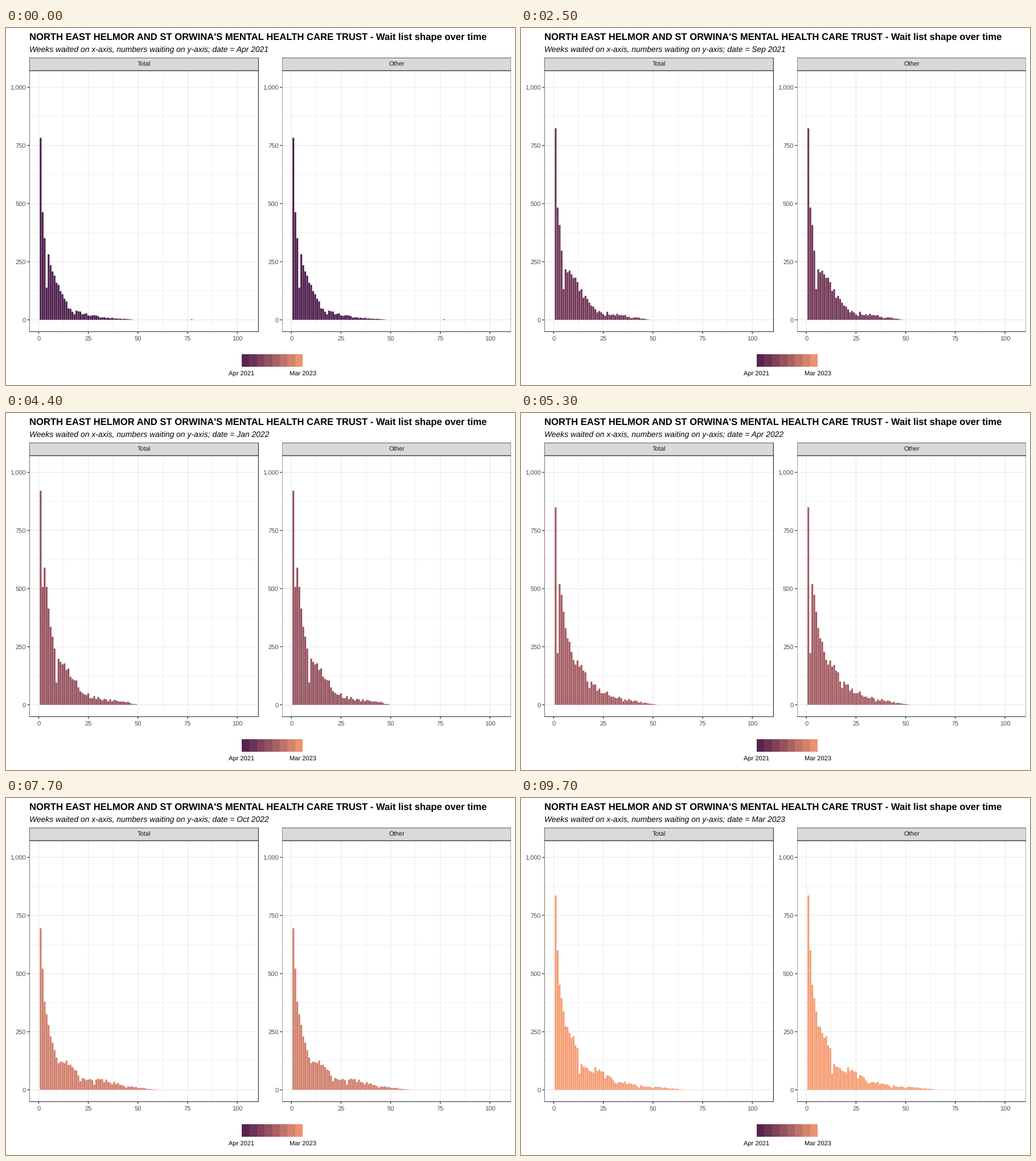
Write a matplotlib script that moves like this. It is 894 px wide and 626 px high and loops after 10000 ms.

```python
import numpy as np
import matplotlib.pyplot as plt
from matplotlib.animation import FuncAnimation
from matplotlib.collections import LineCollection, PolyCollection
from matplotlib.patches import Rectangle
from matplotlib.transforms import Bbox

W, H, DPI = 894, 626, 100
FRAMES, INTERVAL = 100, 100
PX = 72 / DPI  # points per pixel
MAJOR, MINOR = 1.35 * PX, 0.67 * PX

PANELS = {"Total": 41.0, "Other": 484.8}
PANEL_W, STRIP_TOP, TOP, BOTTOM = 402.5, 52.1, 74.8, 532.6
X_UNIT, X_ZERO = 3.4884, 16.38
Y_UNIT, Y_ZERO = 0.4076, 511.7

TITLE = ("NORTH EAST HELMOR AND ST ORWINA'S MENTAL HEALTH CARE TRUST"
         " - Wait list shape over time")
SUBTITLE = "Weeks waited on x-axis, numbers waiting on y-axis; date = "
NAMES = "Jan Feb Mar Apr May Jun Jul Aug Sep Oct Nov Dec".split()
MONTHS = [f"{NAMES[(k + 3) % 12]} {2021 + (k + 3) // 12}" for k in range(24)]

# The list is a smooth curve through a few points, blended from month to month.
WEEKS = np.arange(1, 106)
POINT_WEEKS = [1, 2, 3, 6, 10, 15, 22, 32, 45]
POINTS = {0: [783, 463, 383, 240, 145, 55, 27, 10, 3],
          2: [837, 506, 370, 262, 165, 72, 24, 14, 3],
          5: [824, 483, 408, 220, 190, 103, 34, 23, 5],
          10: [921, 507, 590, 328, 195, 141, 54, 23, 11],
          14: [903, 599, 499, 320, 195, 158, 70, 42, 7],
          18: [695, 521, 379, 225, 120, 112, 55, 40, 14],
          23: [836, 600, 452, 273, 225, 108, 80, 33, 17]}
# Few people join in a holiday week, and that gap ages with the list.
HOLIDAYS = [-3.05, 0.1, 4.9, 8.95, 12.55, 14.1, 20.95]
WEEKS_PER_MONTH = 4.35
ragged = np.random.default_rng(7).uniform(-1, 1, 240)


def waiting(month):
    heights = [np.interp(month, list(POINTS), column)
               for column in zip(*POINTS.values())]
    last = np.interp(month, [0, 10, 23], [47, 49, 66])
    counts = np.interp(WEEKS, POINT_WEEKS + [last + 1], heights + [0])
    cohort = round(month * WEEKS_PER_MONTH) - WEEKS + WEEKS.size
    counts *= 1 + 0.25 * np.clip((WEEKS - 3) / 25, 0, 1) * ragged[cohort]
    for holiday in HOLIDAYS:
        age = (month + 1 - holiday) * WEEKS_PER_MONTH
        if age > 0:
            counts *= 1 - 0.6 * np.exp(-((WEEKS - age) / 0.65) ** 2)
    if month < 4:  # one very long wait
        counts[round(77 + month * WEEKS_PER_MONTH) - 1] = 2
    return counts


# Colour ramp, blended in CIE Lab.
TO_XYZ = np.array([[0.4124, 0.3576, 0.1805],
                   [0.2126, 0.7152, 0.0722],
                   [0.0193, 0.1192, 0.9505]])
WHITE = TO_XYZ.sum(axis=1)
TO_LAB = np.array([[0, 116, 0], [500, -500, 0], [0, 200, -200]])


def to_lab(rgb):
    c = np.array(rgb) / 255
    linear = np.where(c > 0.04045, ((c + 0.055) / 1.055) ** 2.4, c / 12.92)
    return TO_LAB @ np.cbrt(TO_XYZ @ linear / WHITE)


def from_lab(lab):
    linear = np.linalg.solve(TO_XYZ, np.linalg.solve(TO_LAB, lab) ** 3 * WHITE)
    linear = np.clip(linear, 0, 1)
    return np.where(linear > 0.0031308, 1.055 * linear ** (1 / 2.4) - 0.055,
                    12.92 * linear)


DARK, LIGHT = to_lab((76, 29, 75)), to_lab((246, 156, 115))


def ramp(t):
    return from_lab(DARK + (LIGHT - DARK) * t)


plt.rcParams.update({"font.family": "Liberation Sans", "text.hinting": "none"})
fig = plt.figure(figsize=(W / DPI, H / DPI), dpi=DPI, facecolor="white")
ax = fig.add_axes([0, 0, 1, 1])
ax.set(xlim=(0, W), ylim=(H, 0))
ax.axis("off")


def label(x, y, text, size=8, color="black", ha="center", **style):
    return ax.text(x, y, text, size=size, color=color, ha=ha, va="baseline", **style)


def box(x0, y0, x1, y1, **style):
    """A rectangle whose outline is cut off at its own edges."""
    patch = ax.add_patch(Rectangle((x0, y0), x1 - x0, y1 - y0, snap=False, **style))
    patch.set_clip_box(Bbox([[x0, H - y1], [x1, H - y0]]))


def lines(segments, color, lw, z):
    art = LineCollection(segments, colors=color, linewidths=lw, zorder=z)
    art.set_snap(False)
    ax.add_collection(art, autolim=False)


def px(left, week):
    return left + X_ZERO + week * X_UNIT


def py(count):
    return Y_ZERO - count * Y_UNIT


def grid(left, weeks, values, lw, z):
    lines([[(px(left, w), TOP), (px(left, w), BOTTOM)] for w in weeks]
          + [[(left, py(v)), (left + PANEL_W, py(v))] for v in values],
          "#ebebeb", lw, z)


def draw_panel(name, left):
    right = left + PANEL_W
    weeks, values = range(0, 101, 25), range(0, 1001, 250)
    border = dict(edgecolor="#333333", linewidth=MAJOR)
    grid(left, np.arange(12.5, 100, 25), range(125, 1000, 250), MINOR, 1)
    grid(left, weeks, values, MAJOR, 2)
    box(left, TOP, right, BOTTOM, facecolor="none", zorder=4, **border)
    box(left, STRIP_TOP, right, TOP, facecolor="#d9d9d9", zorder=5, **border)
    label((left + right) / 2, 67.3, name, color="#1a1a1a", zorder=6)
    lines([[(px(left, w), BOTTOM), (px(left, w), BOTTOM + 3.5)] for w in weeks]
          + [[(left - 3.5, py(v)), (left, py(v))] for v in values],
          "#333333", MAJOR, 4)
    for w in weeks:
        label(px(left, w), 547.5, str(w), color="#4d4d4d")
    for v in values:
        label(left - 6.2, py(v) + 4.3, f"{v:,}", color="#4d4d4d", ha="right")
    bars = PolyCollection([], edgecolors="none", zorder=3)
    bars.set_snap(False)
    ax.add_collection(bars, autolim=False)
    return bars


def draw_legend(left=414, width=107, steps=8):
    edges = np.linspace(left, left + width, steps + 1)
    for i in range(steps):
        box(edges[i], 572, edges[i + 1], 594, facecolor=ramp((i + 0.5) / steps),
            linewidth=0, antialiased=False)
    label(left, 609, MONTHS[0])
    label(left + width, 609, MONTHS[-1])


label(41, 20.4, TITLE, size=12, ha="left", weight="bold")
subtitle = label(41, 42.1, "", size=10, ha="left", style="italic")
panel_bars = {left: draw_panel(name, left) for name, left in PANELS.items()}
draw_legend()

SWITCHES = np.array([*range(5, 20, 5), *range(20, 97, 4)])


def update(frame):
    # The bars switch one step ahead of the date in the subtitle.
    month = int(np.sum(SWITCHES <= frame))
    dated = int(np.sum(SWITCHES < frame))
    subtitle.set_text(SUBTITLE + MONTHS[dated])
    counts = waiting(month)
    for left, bars in panel_bars.items():
        verts = []
        for week, count in zip(WEEKS, counts):
            if count > 0:
                x0, x1 = px(left, week - 0.45), px(left, week + 0.45)
                y0, y1 = py(0), py(count)
                verts.append([(x0, y0), (x0, y1), (x1, y1), (x1, y0)])
        bars.set_verts(verts)
        bars.set_facecolor(ramp(month / 23))
    return [subtitle, *panel_bars.values()]


anim = FuncAnimation(fig, update, frames=FRAMES, interval=INTERVAL,
                     repeat=True, repeat_delay=0, blit=False)
plt.show()
```
